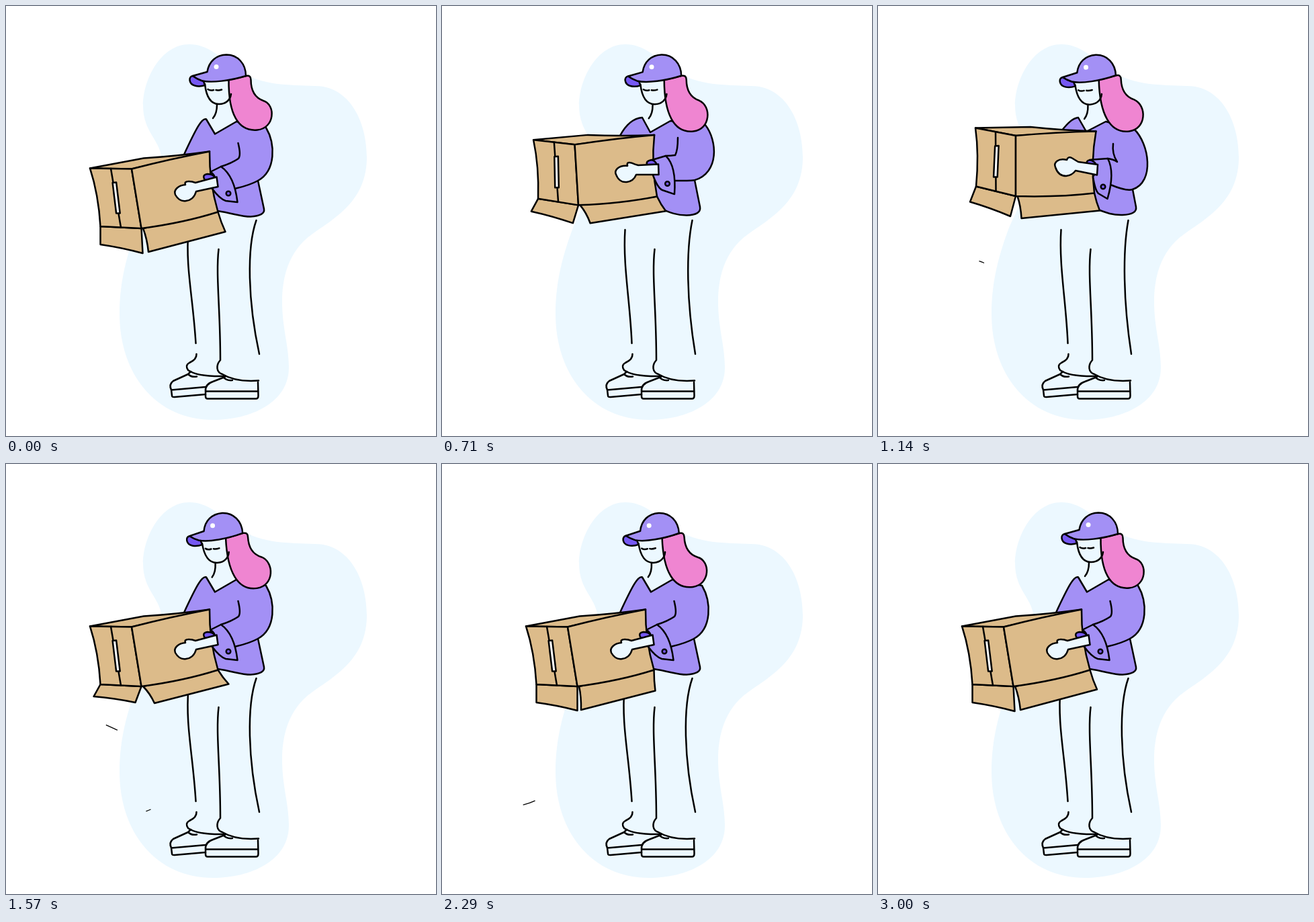
Animation of 640x640 px, one loop 3.07 s. Source, as an HTML page with a canvas:

```html
<!DOCTYPE html>
<html lang="en">
<head>
<meta charset="utf-8">
<title>Carrying a box</title>
<style>
html, body { margin: 0; width: 100%; height: 100%; overflow: hidden; background: #fff; }
canvas { display: block; width: 640px; height: 640px; }
</style>
</head>
<body>
<canvas id="stage" width="640" height="640"></canvas>
<script>
const ctx = document.getElementById('stage').getContext('2d');
const LOOP = 3070, STEP = LOOP / 43;
const SKY = '#ecf8ff', LILAC = '#a390f5', VIOLET = '#7658f2', PINK = '#ef85d1', CARD = '#dcbb8a';

// Lift poses, from low to high; each list is blended by the lift value 0..3.
const torso = [
  'M298,168.5 C292,166 284,180 265,221 L290,300 L315,305 C340,309 350,313.5 364,313.5 Q386,312 384,302 L375,260 C402,245 401,205 387,181 L343,172 L311,190.5 Z',
  'M298,168.5 C292,166 286,180 272,206 L290,290 L320,304 C340,309 350,313.5 364,313.5 Q386,312 384,302 L375,261 C410,248 407,200 390,178 L343,172 L311,190.5 Z',
  'M298,166 C286,167 274,176 265,193 L290,280 L325,301 C340,308 350,311.5 364,311.5 Q386,311 384,299 L376,259 C413,248 410,200 392,177 L340,171 L310,188 Z',
  'M298,166 C289,167 281,176 273,186 L290,275 L325,302 C340,308 350,311.5 364,311 Q386,310 384,299 L379,273 C412,262 404,205 381,183 L339,172 L310,187 Z'
];
const sleeve = [
  'M345.5,204 Q350,222 346,227 Q336,234 320,239 M342,271.5 Q362,267 375,260',
  'M347.5,200 Q350,215 347,221 Q342,228 326,232 M344,266 Q362,264 375,261',
  'M351,196 Q351,215 347,222 Q340,223 333,223 M347,260 Q365,260 376,259',
  'M350,205 Q348,220 356,232 Q350,228 342,227 M346,266 Q370,276 379,273'
];
const opening = [
  'M296,259 Q291,251 300,250 Q309,250 312,257 Z',
  'M300,247 Q298,240 308,239 Q316,240 318,246 Z',
  'M305,236 Q303,230 313,229 Q320,230 322,236 Z',
  'M311,235 Q309,229 319,229 Q326,230 327,236 Z'
];
const cuff = [
  'M304,247 L320,239 Q340,253 344.5,292 L327,290 Q318,287 307,272 L313,262 Q311,250 304,247 Z',
  'M308,239 L326,232 Q344,242 345.5,286.5 L330,282 Q322,281 311,264 L319,253 Q317,242 308,239 Z',
  'M313,229 L333,223 Q349,238 346,280 L328,274 Q321,271 314,252 L322,243 Q320,232 313,229 Z',
  'M315,229 L342,227 Q353,248 341.5,287 L328,279 Q323,274 320,254 L326,245 Q327,232 315,229 Z'
];
const hand = [
  'M313.5,254.5 L282,263 Q277,261 272,261 Q265,261 267,266 C256,267 249,274 252,281 C256,288 262,291 268,290 C276,289 281,283 283,276 L315.5,269 Z',
  'M317.5,245.5 L289,249 Q284,248 279,247 Q270,245 271,252 C258,252 252,259 255,266 C258,273 265,277 272,276 C279,275 284,269 286,264 L319,261 Z',
  'M322,235.5 L292,237 Q287,236 283,234 Q274,231 276,238 C262,237 256,245 259,251 C262,259 268,263 275,262 C283,261 287,256 289,251 L322.5,251 Z',
  'M327,236 L298,232 Q293,229 289,226.5 Q283,223 281,229 C268,226 261,233 264,240 C267,249 273,253 280,253 C288,252 291,249 294,245 L326,251.5 Z'
];
const legs = [
  'M271.5,333 C267,390 278,430 282.5,502 M372.5,319 C358,360 360,440 377,518',
  'M272,333 C267,390 278,430 282.5,502 M372.5,319 C358,360 360,440 377,518',
  'M272.5,333 C269,385 280,440 282.5,502 M372.5,319 C363,365 364,440 377,518',
  'M272.5,333 C269,385 280,440 282.5,502 M372.5,319 C364,365 365,440 377,518'
];
const button = ['M331,279', 'M333.5,271.5', 'M335.5,264.5', 'M335,269'];

// Corners: top left, back, top right, top front, low left, low front, low right.
const corners = [
  '125,241.5 205,226.5 303,216.5 187,242.5 140.5,328 201.5,331 315.5,306.5',
  '130,220.5 211,209 309,204.5 192,224.5 141.5,307.5 202.5,314 318,295.5',
  '136,199.5 217,192 316,192 197.5,206.5 143,287 203,296.5 320,283.5',
  '145,181.5 227,180 324.5,186.5 205,193 146,268.5 205,283 322,278.5'
];

const lift = [[0, 0], [360, 1], [710, 2], [1140, 3], [1570, 0], [LOOP, 0]];
const nod = [[0, 0], [360, 0], [710, .17], [1140, .62], [1570, .98], [1720, 1], [2060, 1], [2290, .86], [2650, .3], [3000, 0]];
const drape = [[0, 0], [360, 1], [710, 2.4], [1140, 3.3], [1570, 2.5], [2290, .3], [3000, 0]];
// Time, then offsets of the free corners: left flap outer, inner; right flap inner, outer.
const flaps = [
  [0, 0, 27, 2, 37, 8, 35, 11, 29.5],
  [360, -1, 27, -1, 36, 10, 35, 11, 29],
  [710, -10, 19, -8, 27, 15, 27, 13, 22],
  [880, -31, 5, -28, 11, 30, 14, 30, 9],
  [1140, -9, 23, -8, 30, 6, 33, 8, 26],
  [1400, -20, 12, -18, 18, 25, 19, 25, 15],
  [1570, -10, 18, -9, 24, 17, 25, 16, 21],
  [1900, 1, 27, 1, 36, 1, 35, -1, 31],
  [2290, 0, 27, 0, 36, 3, 35, 2, 31],
  [3000, 0, 27, 2, 37, 8, 35, 10.5, 29]
];
// Start, duration, length, path.
const streaks = [
  [1110, 390, 77, 'M158,382.5 Q120,368 84,364'],
  [1450, 500, 105, 'M176,401 Q120,374 80,363'],
  [1540, 470, 98, 'M215.5,514 Q185,528 120,518'],
  [2146, 470, 99, 'M152,493 Q122,516 59,511']
];

// Monotone cubic through keyed values.
function track(keys, t, col = 1) {
  const slope = i => keys[i + 1] && keys[i]
    ? (keys[i + 1][col] - keys[i][col]) / (keys[i + 1][0] - keys[i][0]) : 0;
  const tangent = i => {
    const a = slope(i - 1), b = slope(i);
    return a * b > 0 ? 2 * a * b / (a + b) : 0;
  };
  const last = keys.length - 1;
  if (t >= keys[last][0]) return keys[last][col];
  let i = 0;
  while (t >= keys[i + 1][0]) i++;
  const span = keys[i + 1][0] - keys[i][0], u = (t - keys[i][0]) / span, v = 1 - u;
  return keys[i][col] * v * v * (1 + 2 * u) + keys[i + 1][col] * u * u * (3 - 2 * u)
    + span * u * v * (tangent(i) * v - tangent(i + 1) * u);
}

function mix(poses, p) {
  const num = /[\d.]+/g, i = Math.min(2, Math.floor(p)), k = p - i;
  const next = poses[i + 1].match(num);
  let n = 0;
  return poses[i].replace(num, a => +a + (next[n++] - a) * k);
}

function draw(d, fill, line = true) {
  const path = new Path2D(d);
  if (fill) { ctx.fillStyle = fill; ctx.fill(path); }
  if (line) ctx.stroke(path);
}

function dot(x, y, r, fill, line) {
  draw(`M${x - r},${y} a${r},${r} 0 1 0 ${2 * r},0 a${r},${r} 0 1 0 ${-2 * r},0 Z`, fill, line);
}

function drawBackdrop() {
  draw('M273,57 C300,57 318,75 342,95 C385,120 420,117 460,119 C510,119 537,170 537,225 C537,290 490,315 455,340 C420,365 411,405 411,440 C411,480 421,505 421,538 C421,590 365,616 308,616 C225,616 169,550 169,458 C169,410 180,370 195,330 C215,285 232,260 232,232 C232,200 204,190 204,148 C204,110 230,57 273,57 Z', SKY, false);
}

function drawFeet() {
  draw('M316.5,362 C312,400 319,450 319,527 C312,535 313,545 322,548 C335,556 355,559 376,557.5');
  draw('M283.5,518 Q284,526 273,531 Q266,535 271,542 Q285,552 326,551');
  draw('M326,552 L308,559 Q296,563 297,573.5 L297,581 Q297,584.5 300,584.5 L372,584.5 Q375.5,584.5 375.5,580 L375,560 M297,573.5 H375.5 M323,552 Q328,558 337,557');
  draw('M275,544 L271,548 L249,558 Q242,563 246,571.5 L247,580 Q247,582.5 251,582 L297,578 M246,571.5 L297,567 M271,548 Q276,553 284,551.5');
}

function drawHead(t) {
  const k = track(nod, t), d = track(drape, t);
  ctx.save();
  ctx.translate(335 - 1.5 * k, 165);
  ctx.rotate(-.055 * k);
  ctx.translate(-335, -165);
  draw('M314,147 Q314,160 308,167');
  draw(`M331.5,110 L358,104 Q364.5,103 364.5,110 C364.5,128 372,137 383,141 C402,${147 + d} 400,${182 + d} 374,${184.5 + d} C345,${187 + d} 331,160 331.5,110 Z`, PINK);
  draw('M296,116 C298,135 304,146 317,146 C328,146 334,139 335,131');
  draw('M300.5,124 Q304,126.5 309,125 M312.5,125 Q316,126 321,124.5');
  draw('M278,104 C271,105 272,116 281,118.5 Q288,120.5 296,118 L294,112 Q285,109 278,104 Z', VIOLET);
  draw('M299.5,98 C302,82 313,73 328,72.5 C345,72.5 357,86 357,104 C335,111 305,115 291,111 Q283,108 278,104 Z', LILAC);
  dot(313, 90.5, 3.5, '#fff', false);
  ctx.restore();
}

function drawBox(t, p) {
  const [tl, back, tr, front, low, edge, right] =
    mix(corners, p).split(' ').map(s => s.split(',').map(Number));
  const add = (a, x, y) => [a[0] + x, a[1] + y];
  const at = (a, b, k) => [a[0] + (b[0] - a[0]) * k, a[1] + (b[1] - a[1]) * k];
  const mid = (a, b, x, y) => add(at(a, b, .5), x, y);
  const f = flaps[0].map((_, i) => i && track(flaps, t, i));

  const lo = add(low, f[1], f[2]), li = add(edge, f[3], f[4]);
  const hinge = add(edge, 2.5, 0), ri = add(edge, f[5] + 2.5, f[6]), ro = add(right, f[7], f[8]);
  draw(`M${low} L${lo} Q${mid(lo, li, 0, -2)} ${li} L${edge} Z`, CARD);
  draw(`M${hinge} Q${mid(hinge, ri, 2, -2)} ${ri} L${ro} Q${mid(ro, right, -1, 1)} ${right} Z`, CARD);

  draw(`M${tl} L${back} Q${mid(back, tr, 0, 2)} ${tr} L${front} Z`, CARD);
  draw(`M${tl} L${front} L${edge} L${low} Q${mid(tl, low, 5, -4)} ${tl} Z`, CARD);
  draw(`M${front} Q${mid(front, tr, 0, -2)} ${tr} Q${mid(tr, right, -7, 0)} ${right} Q${mid(edge, right, 6, 4)} ${edge} Z`, CARD);

  const top = at(tl, front, .5), foot = at(low, edge, .5);
  draw(`M${top} L${foot}`);
  const a = at(top, foot, .24), b = at(top, foot, .76);
  draw(`M${add(a, -1, 0)} L${add(a, 4.5, -.5)} L${add(b, 2.3, 0)} L${add(b, -3.3, 0)} Z`, '#fff');
}

function drawStreaks(t) {
  const size = 19;
  ctx.save();
  ctx.lineWidth = 1.3;
  ctx.lineCap = 'butt';
  ctx.setLineDash([size, 999]);
  for (const [start, time, length, d] of streaks) {
    const u = (t - start) / time;
    if (u <= 0 || u >= 1) continue;
    ctx.lineDashOffset = size - u * (length + size);
    draw(d);
  }
  ctx.restore();
}

function render(t) {
  const p = track(lift, t);
  ctx.fillStyle = '#fff';
  ctx.fillRect(0, 0, 640, 640);
  ctx.strokeStyle = '#000';
  ctx.lineWidth = 2.5;
  ctx.lineCap = ctx.lineJoin = 'round';
  drawBackdrop();
  draw(mix(legs, p));
  drawFeet();
  draw(mix(torso, p), LILAC);
  drawHead(t);
  drawBox(t, p);
  draw(mix(sleeve, p));
  draw(mix(opening, p), VIOLET);
  draw(mix(cuff, p), LILAC);
  draw(mix(hand, p), SKY);
  const [x, y] = mix(button, p).slice(1).split(',').map(Number);
  dot(x, y, 3.3, VIOLET, true);
  drawStreaks(t);
}

function tick() {
  const t = performance.now() % LOOP;
  render(Math.min(42, Math.floor((t + 5) / STEP)) * STEP);
  requestAnimationFrame(tick);
}
tick();
</script>
</body>
</html>
```
